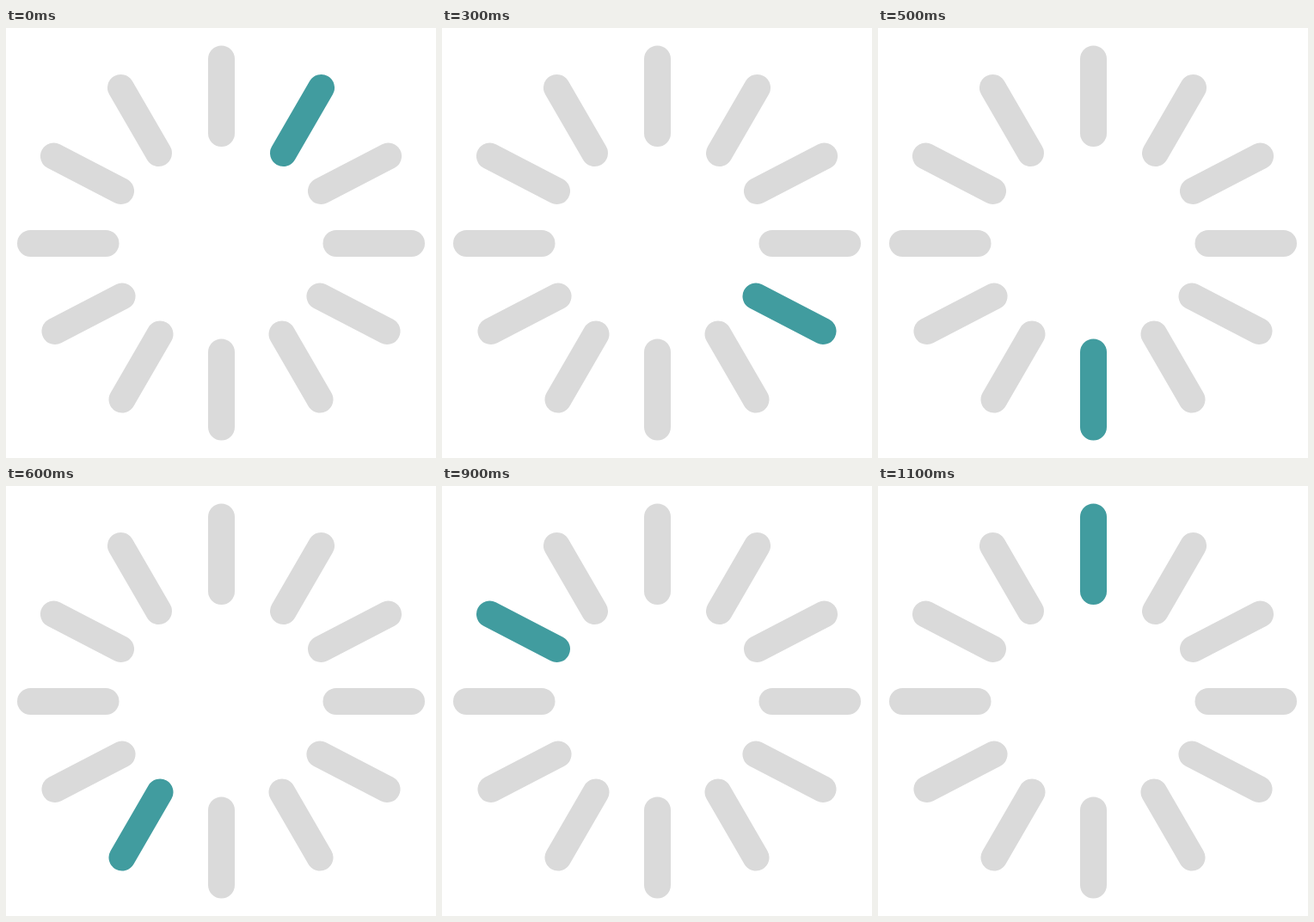
These frames come from a looping animation (500x500 px, 1.2 s). An HTML page:

```html
<!DOCTYPE html>
<html lang="en">
<head>
<meta charset="utf-8">
<title>Loading spinner</title>
<style>
  html, body { margin: 0; height: 100%; overflow: hidden; background: #fff; }
  svg { display: block; width: 100vw; height: 100vh; }
  line { stroke: #dadada; stroke-width: 31; stroke-linecap: round; }
  .on { stroke: #419c9f; }
</style>
</head>
<body>
<svg viewBox="0 0 500 500"></svg>
<script>
  const svg = document.querySelector('svg');
  const STEP = 100;

  // Right half, clockwise from one o'clock to six: x1, y1, x2, y2
  const right = [
    [366.5, 69.5, 322.5, 145.5],
    [444.5, 149, 366.5, 189.5],
    [471.5, 250.5, 384, 250.5],
    [443, 352.5, 365, 312],
    [365, 432, 321, 356]
  ];
  const mirror = ([x1, y1, x2, y2]) => [500 - x1, y1, 500 - x2, y2];
  const spokes = [
    ...right,
    [250.5, 464, 250.5, 377],
    ...right.map(mirror).reverse(),
    [250.5, 36, 250.5, 122.5]
  ];

  const bars = spokes.map(points => {
    const bar = document.createElementNS('http://www.w3.org/2000/svg', 'line');
    ['x1', 'y1', 'x2', 'y2'].forEach((name, i) => bar.setAttribute(name, points[i]));
    return svg.appendChild(bar);
  });

  const start = performance.now();
  function draw() {
    const elapsed = performance.now() - start;
    const active = Math.floor(elapsed / STEP) % bars.length;
    bars.forEach((bar, i) => bar.classList.toggle('on', i === active));
    requestAnimationFrame(draw);
  }
  draw();
</script>
</body>
</html>
```
